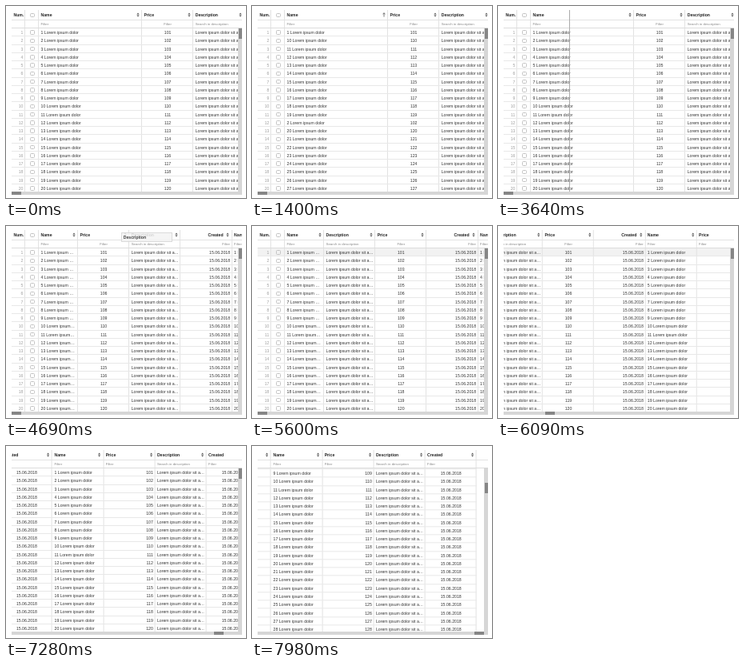
These frames come from a looping animation (300x240 px, 8000 ms). An HTML page:

```html
<!DOCTYPE html>
<html lang="en">
<head>
<meta charset="utf-8">
<title>Data grid</title>
<style>
html, body { margin: 0; width: 100%; height: 100%; overflow: hidden; background: #fff; }
body { position: relative; font: 5.2px "Liberation Sans", Arial, sans-serif; color: #333; }
div { position: absolute; box-sizing: border-box; white-space: nowrap; }
#head { left: 7px; top: 5px; width: 288px; height: 23px; overflow: hidden; }
#head::before, #head::after { content: ""; position: absolute; left: 0; width: 100%; height: 1px; background: #e2e2e2; }
#head::before { top: 12px; }
#head::after { top: 22px; background: #dcdcdc; }
#body { left: 7px; top: 28px; width: 283px; height: 204px; overflow: hidden; }
#hover { left: 0; top: 0; width: 100%; height: 10px; background: #f2f2f2; }
.strip { left: 0; top: 0; }
.col { top: 0; border-right: 1px solid #e2e2e2; }
.title { left: 2.5px; right: 0; top: 0; height: 12px; line-height: 12px; font-weight: bold; font-size: 5.15px; color: #222; }
.filter { left: 2.5px; right: 1.5px; top: 12px; height: 11px; line-height: 11px; font-size: 4.4px; color: #858585; }
.right { text-align: right; }
.title.right { right: 10px; }
.center { text-align: center; }
.icon { position: absolute; right: 2.2px; top: 3px; width: 4px; height: 6px; }
.cell { left: 0; right: -1px; height: 10.26px; line-height: 10.26px; padding: 0 2.5px; overflow: hidden; text-overflow: ellipsis; border-bottom: 1px solid #e8e8e8; }
.name .cell { padding-right: 4px; }
.desc .cell { padding-right: 1.5px; }
.num .cell { color: #a0a0a0; }
.box { left: 5.5px; width: 6px; height: 5.5px; border: 1px solid #c4c4c4; border-radius: 1.5px; }
#guide { top: 5px; width: 1px; height: 227px; background: #aaa; }
#ghost { width: 64px; height: 12px; background: #f4f4f4; border: 1px solid #d4d4d4; opacity: .85; }
#ghost .title { left: 1.5px; line-height: 10px; }
.track { background: #d6d6d6; }
.thumb { background: #868686; }
</style>
</head>
<body>
<div id="head"><div class="strip" id="heads"></div></div>
<div id="body"><div id="hover"></div><div class="strip" id="cols"></div></div>
<div id="guide"></div>
<div id="ghost"><div class="title">Description</div></div>
<div class="track" style="left:290px;top:27px;width:5px;height:205px"></div>
<div class="thumb" id="vThumb" style="left:290.5px;top:28px;width:4px;height:13px"></div>
<div class="track" style="left:7px;top:232px;width:288px;height:4px"></div>
<div class="thumb" id="hThumb" style="left:7px;top:232px;width:12px;height:4px"></div>
<script>
const LOOP = 8000, STEP = 70, ROW = 10.26, SLOTS = 30, TOTAL = 99, WIDE = 64.2;
const MAX_X = 515.4, MAX_Y = 80.7;
const $ = id => document.getElementById(id);

const both = '<path d="M.4 2.4 2 .5 3.6 2.4zM.4 3.6 2 5.5 3.6 3.6z" fill="#555"/>';
const arrow = '<path d="M2 5.6V.7M.4 2.4 2 .7 3.6 2.4" fill="none" stroke="#444" stroke-width=".7"/>';
const arrowDown = `<g transform="matrix(1 0 0 -1 0 6.2)">${arrow}</g>`;
const sortIcons = { none: both, asc: arrow, desc: arrowDown };

const natural = Array.from({ length: TOTAL }, (_, i) => i + 1);
const ascending = natural.map(String).sort().map(Number);
const orders = { none: natural, asc: ascending, desc: [...ascending].reverse() };

const values = {
  num: (n, i) => i + 1,
  check: () => '',
  name: n => n + ' Lorem ipsum dolor',
  price: n => 100 + n,
  desc: () => 'Lorem ipsum dolor sit amet, consectetur',
  date: () => '15.06.2018'
};

const column = (kind, title, align = '', filterAlign = '', titleAlign = '') =>
  ({ kind, title, align, filterAlign, titleAlign });

const group = () => [
  column('name', 'Name'),
  column('price', 'Price', 'right'),
  column('desc', 'Description'),
  column('date', 'Created', 'center')
];

const columns = [
  column('num', 'Num.', 'right'),
  column('check', ''),
  column('name', 'Name'),
  column('price', 'Price', 'center', 'center'),
  column('desc', 'Description'),
  column('date', 'Created', 'right', 'right', 'right'),
  ...group(), ...group()
];

function add(parent, className, text = '') {
  const el = document.createElement('div');
  el.className = className;
  el.textContent = text;
  parent.append(el);
  return el;
}

function addBox(parent, top) {
  add(parent, 'box').style.top = top + 'px';
}

for (const c of columns) {
  const plain = c.kind === 'num' || c.kind === 'check';
  c.head = add($('heads'), 'col');
  c.head.style.height = '23px';
  add(c.head, 'title ' + c.titleAlign, c.title);
  if (!plain) {
    const hint = c.kind === 'desc' ? 'Search in description' : 'Filter';
    add(c.head, 'filter ' + c.filterAlign, hint);
    c.head.insertAdjacentHTML('beforeend', `<svg class="icon" viewBox="0 0 4 6">${both}</svg>`);
  }
  if (c.kind === 'check') addBox(c.head, 3.5);

  c.body = add($('cols'), 'col ' + c.kind);
  c.body.style.height = SLOTS * ROW + 'px';
  c.cells = Array.from({ length: SLOTS }, (_, i) => {
    const cell = add(c.body, 'cell ' + c.align);
    cell.style.top = i * ROW + 'px';
    if (c.kind === 'check') addBox(cell, 2.3);
    return cell;
  });
}

function fill(sort) {
  for (const c of columns) {
    if (c.kind === 'check') continue;
    c.cells.forEach((cell, i) => { cell.textContent = values[c.kind](orders[sort][i], i); });
  }
  columns[2].head.querySelector('svg').innerHTML = sortIcons[sort];
}

function arrange(narrow, swapped) {
  const list = [...columns];
  if (swapped) [list[3], list[4]] = [list[4], list[3]];
  let x = 0;
  list.forEach((c, i) => {
    const w = i < 2 ? 17 : i === 2 ? (narrow ? 49 : 129) : WIDE;
    for (const el of [c.head, c.body]) {
      el.style.left = x + 'px';
      el.style.width = w + 'px';
    }
    x += w;
  });
}

// Share of n steps done, the first landing at start.
const steps = (t, start, n) =>
  Math.min(Math.max(Math.floor((t - start) / STEP) + 1, 0), n) / n;
const show = (el, on) => { el.style.visibility = on ? 'visible' : 'hidden'; };

let lastSort, lastLayout;

function render(t) {
  const sort = t >= 1400 && t < 1890 ? 'asc' : t >= 1890 && t < 2100 ? 'desc' : 'none';
  if (sort !== lastSort) fill(lastSort = sort);

  const narrow = t >= 3780, swapped = t >= 5180;
  const layout = narrow + '/' + swapped;
  if (layout !== lastLayout) {
    arrange(narrow, swapped);
    lastLayout = layout;
  }

  show($('guide'), t >= 3080 && t < 3780);
  $('guide').style.left = 166 - 77 * steps(t, 3010, 9) + 'px';

  const drag = steps(t, 4620, 7);
  show($('ghost'), t >= 4620 && t < 5180);
  $('ghost').style.left = 154 - 34 * drag + 'px';
  $('ghost').style.top = 6 + 8 * drag + 'px';

  show($('hover'), t >= 5600 && t < 7280);

  const x = 481.4 * steps(t, 5740, 20) ** 1.32 + (MAX_X - 481.4) * steps(t, 7420, 3);
  const y = MAX_Y * steps(t, 7770, 4);
  $('heads').style.transform = `translateX(${-x}px)`;
  $('cols').style.transform = `translate(${-x}px, ${-y}px)`;
  $('hThumb').style.left = 7 + 271 * x / MAX_X + 'px';
  $('vThumb').style.top = 28 + 18.4 * y / MAX_Y + 'px';
}

const began = performance.now();
function tick() {
  render((performance.now() - began) % LOOP);
  requestAnimationFrame(tick);
}
tick();
</script>
</body>
</html>
```
